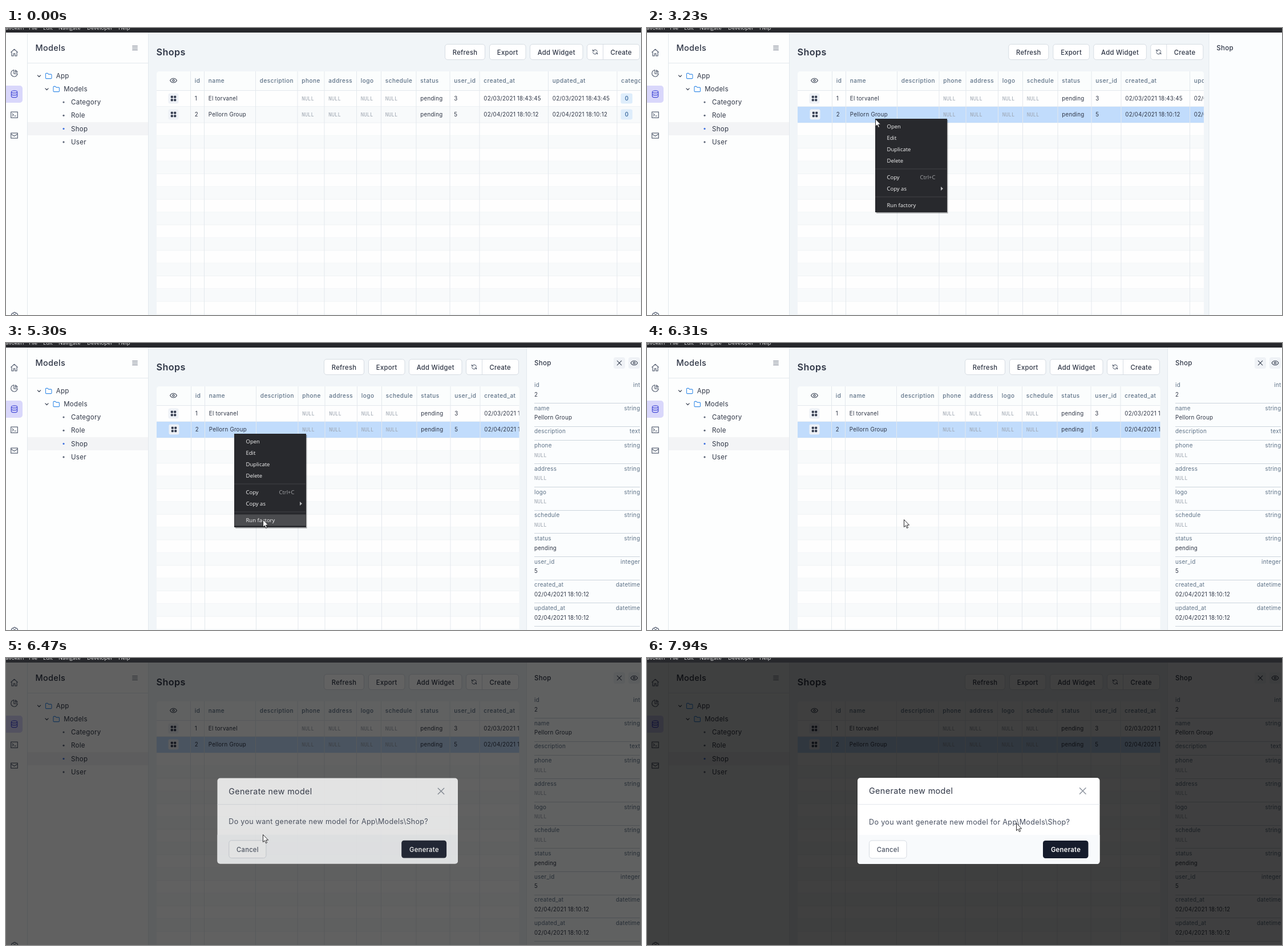
Write an HTML page that moves like this. It is 1113 by 503 pixels and loops after 8000 ms.

```html
<!DOCTYPE html>
<html lang="en">
<head>
<meta charset="utf-8">
<title>Model browser</title>
<style>
  html, body { margin: 0; width: 100%; height: 100%; overflow: hidden; background: #f1f5f8; }
  svg { display: block; width: 100vw; height: 100vh; }
  text { font-family: Inter, sans-serif; letter-spacing: .025em; white-space: pre; }
  .mono { font-family: "Noto Sans Mono", "DejaVu Sans Mono", monospace; letter-spacing: 0; }
  .sys { font-family: "Open Sans", "Noto Sans", sans-serif; letter-spacing: 0; }
  .head { letter-spacing: .05em; font-weight: 500; }
  .mid { font-weight: 500; }
  .bold { font-weight: 600; }
</style>
</head>
<body>
<svg id="stage" viewBox="0 0 1113 503" xmlns="http://www.w3.org/2000/svg"></svg>
<script>
const LOOP = 8000;
const INK = '#2f3646', LABEL = '#5d7186', RULE = '#e3e8ed';

const rect = (x, y, w, h, fill, extra = '') =>
  `<rect x="${x}" y="${y}" width="${w}" height="${h}" fill="${fill}" ${extra}/>`;
const line = (x1, y1, x2, y2, color = RULE) =>
  `<path d="M${x1} ${y1}L${x2} ${y2}" stroke="${color}"/>`;
// y is the vertical middle of the capitals
const text = (x, y, s, size, fill = INK, cls = '', anchor = 'start') =>
  `<text x="${x}" y="${y + size * .36}" font-size="${size}" fill="${fill}" class="${cls}" text-anchor="${anchor}">${s}</text>`;
// paths live on a 24 unit grid
const icon = (cx, cy, size, color, d, weight = 2) =>
  `<path transform="translate(${cx - size / 2} ${cy - size / 2}) scale(${size / 24})" d="${d}" fill="none"
    stroke="${color}" stroke-width="${weight}" stroke-linecap="round" stroke-linejoin="round"/>`;
const group = (id, body, extra = '') => `<g id="${id}" ${extra}>${body}</g>`;

const ICON = {
  home: 'M3 11L12 3L21 11M5 9.5V21H10V15H14V21H19V9.5',
  pie: 'M11 3.1A9 9 0 1 0 20.9 13H11ZM15 3.5A9 9 0 0 1 20.5 9H15Z',
  data: 'M4 6C4 2 20 2 20 6S4 10 4 6V18C4 22 20 22 20 18V6M4 12C4 16 20 16 20 12',
  term: 'M3 4H21V20H3ZM7 9L10 12L7 15M13 15H16',
  mail: 'M3 5H21V19H3ZM3 7.5L12 13.5L21 7.5',
  gear: 'M10 3H14L15 6L18 5L21 9L19 12L21 15L18 19L15 18L14 21H10L9 18L6 19L3 15L5 12L3 9L6 5L9 6ZM9 12A3 3 0 1 0 15 12A3 3 0 1 0 9 12',
  menu: 'M4 6H20M4 12H20M4 18H20',
  down: 'M5 9L12 16L19 9',
  folder: 'M3 6Q3 4 5 4H9L12 7H19Q21 7 21 9V18Q21 20 19 20H5Q3 20 3 18Z',
  eye: 'M1.5 12C6 3 18 3 22.5 12C18 21 6 21 1.5 12ZM9 12A3 3 0 1 0 15 12A3 3 0 1 0 9 12',
  sync: 'M4 4V9H9M20 20V15H15M4.6 9A8 8 0 0 1 19.9 11M19.4 15A8 8 0 0 1 4.1 13',
  close: 'M5 5L19 19M19 5L5 19'
};

const columns = [
  [324, 'id'], [348, 'name'], [438, 'description'], [511.5, 'phone'], [558.5, 'address'], [615, 'logo'],
  [658, 'schedule'], [719.5, 'status'], [778.5, 'user_id'], [830.5, 'created_at'], [951, 'updated_at'], [1071.5, 'categories']
];
const shops = [
  [1, 'El torvanel', '', null, null, null, null, 'pending', 3, '02/03/2021 18:43:45', '02/03/2021 18:43:45'],
  [2, 'Pellorn Group', '', null, null, null, null, 'pending', 5, '02/04/2021 18:10:12', '02/04/2021 18:10:12']
];
const types = ['int', 'string', 'text', 'string', 'string', 'string', 'string', 'string', 'integer', 'datetime', 'datetime'];

const value = (x, y, v) => v === null
  ? text(x, y, 'NULL', 9, '#9ba3ae', 'mono')
  : text(x, y, v, 9.72, INK);

function menuBar() {
  const items = [[-5, 'Tavoken'], [40, 'File'], [65, 'Edit'], [92, 'Navigate'], [142, 'Developer'], [197, 'Help']];
  return rect(0, 0, 1113, 8, '#27282c') + items.map(([x, s]) => text(x, 0, s, 9.5, '#e6e6e6', 'sys')).join('');
}

function sidebar() {
  let s = rect(0, 8, 250, 495, '#fdfefe') + line(37.5, 8, 37.5, 503) + line(249.5, 8, 249.5, 503) + line(38, 61.5, 250, 61.5);
  s += rect(-6, 101, 35, 30, '#d9d7fb', 'rx="5"');
  ['home', 'pie', 'data', 'term', 'mail'].forEach((k, i) =>
    s += icon(14.5, 43 + i * 36.4, 15.5, k === 'data' ? '#4a50d8' : '#5c6577', ICON[k], 1.9));
  s += icon(15, 504, 15, '#5c6577', ICON.gear);
  s += text(51.5, 35, 'Models', 14.4, INK, 'mid') + icon(226, 35, 13, '#596273', ICON.menu);
  s += rect(38, 165, 211, 23, '#f3f4f6');
  [[58, 84, 'App'], [71.5, 107, 'Models']].forEach(([x, y, name]) => {
    s += icon(x, y, 9, '#3c4556', ICON.down, 3.2) + icon(x + 16.7, y, 14, '#3b8ee8', ICON.folder, 1.9);
    s += text(x + 29.7, y, name, 11.5);
  });
  ['Category', 'Role', 'Shop', 'User'].forEach((name, i) => {
    const y = 130 + i * 23.3;
    s += `<circle cx="101" cy="${y}" r="1.6" fill="${name === 'Shop' ? '#3b6fe0' : '#5c6577'}"/>` + text(114, y, name, 11.5);
  });
  return s;
}

function toolbar() {
  const edge = 'rx="4.5" stroke="#d6dce3"';
  let s = '';
  [[769.5, 70, 'Refresh'], [847.5, 63.5, 'Export'], [918.5, 92.5, 'Add Widget']].forEach(([x, w, name]) =>
    s += rect(x, 28.5, w, 27, '#fff', edge) + text(x + w / 2, 42.5, name, 11.25, INK, 'mid', 'middle'));
  s += rect(1018.5, 28.5, 92, 27, '#fff', edge) + line(1046.5, 29, 1046.5, 55, '#d6dce3');
  return s + icon(1032.5, 42, 12, '#4b5567', ICON.sync) + text(1059.5, 42.5, 'Create', 11.25, INK, 'mid');
}

function gridButton(y) {
  let s = rect(284.5, y - 9, 18, 18, '#eef1f6', 'rx="3"');
  for (const dx of [-4.7, .7]) for (const dy of [-4.7, .7]) s += rect(293.5 + dx, y + dy, 4, 4, '#353d50', 'rx="1"');
  return s;
}

function table() {
  let s = rect(264, 76, 848, 427, '#fefefe') + rect(264, 76, 848, 34, '#fbfdfd') + rect(264, 138, 848, 28, '#f8fafb');
  s += line(264, 109.5, 1112, 109.5) + line(264, 137.5, 1112, 137.5, '#eef1f4') + line(264, 166, 1112, 166, '#eef1f4');
  for (let i = 0; i < 16; i++) {
    const y = 166 + i * 22.37;
    if (i % 2) s += rect(264, y, 848, 22.37, '#f8fafb');
    s += line(264, y + 22.37, 1112, y + 22.37, '#f0f3f5');
  }
  s += rect(264, 138, 848, 28, '#c1dcfc', 'id="picked"');
  s += icon(293.5, 92, 13.5, '#3c4556', ICON.eye) + gridButton(123.5);
  let cells = gridButton(151.5);
  columns.forEach(([x, name], i) => {
    cells += line(x - .5, 76, x - .5, 503) + text(x + 6.8, 92.5, name, 10, LABEL, 'head');
    shops.forEach((shop, r) => {
      const y = 123.5 + r * 28;
      cells += i < 11 ? value(x + 6.8, y, shop[i])
        : rect(1077.5, y - 9, 20.5, 18, '#deedfb', 'rx="3"') + text(1088, y, 0, 9.72, '#2a5b94', 'mid', 'middle');
    });
  });
  return s + group('cells', cells);
}

function panel() {
  let s = rect(913, 8, 202, 495, '#fbfdfe') + line(912.5, 8, 912.5, 503) + text(926, 35, 'Shop', 11.5, INK, 'mid');
  [[1075, 'close', 13], [1101, 'eye', 13.5]].forEach(([x, k, size]) =>
    s += rect(x - 10, 25, 20, 20, '#eff2f6', 'rx="4"') + icon(x, 35, size, '#3c4556', ICON[k]));
  let fields = '', y = 73.5;
  types.forEach((type, i) => {
    const v = shops[1][i], empty = v === '';
    fields += text(926, y, columns[i][1], 9.9, LABEL) + text(1111.5, y, type, 9.9, LABEL, '', 'end');
    if (!empty) fields += value(926, y + 16.8, v);
    fields += line(926, Math.round(y + (empty ? 15.5 : 31.5)) + .5, 1111, Math.round(y + (empty ? 15.5 : 31.5)) + .5, '#ccd4dc');
    y += empty ? 25 : 40.65;
  });
  return s + group('fields', fields);
}

const menuItems = [['Open', 173], ['Edit', 193], ['Duplicate', 213], ['Delete', 232.5], ['Copy', 262], ['Copy as', 282], ['Run factory', 310.5]];

function contextMenu() {
  let s = rect(402, 161, 125.5, 164, '#000', 'opacity=".3"') + rect(400, 159, 126, 164, '#28292d');
  s += rect(400.5, 222.5, 125, 19.8, '#4b4c4f', 'id="hover"');
  s += line(400, 247, 525, 247, '#424347') + line(400, 296, 525, 296, '#424347');
  menuItems.forEach(([name, y]) => s += text(420.5, y, name, 9.5, '#f4f4f4', 'sys'));
  return s + text(505.5, 262, 'Ctrl+C', 9.5, '#a3a4a7', 'sys', 'end') + '<path d="M515 278L519 281.5L515 285Z" fill="#b5b6b8"/>';
}

function dialog() {
  return rect(369, 210, 424.5, 151, '#fff', 'rx="5"')
    + `<path d="M369 310H793.5V356Q793.5 361 788.5 361H374Q369 361 369 356Z" fill="#f8fafc"/>`
    + line(369, 256.5, 793.5, 256.5)
    + text(389, 233, 'Generate new model', 14.4) + icon(763.8, 233, 18, '#8b929d', ICON.close, 1.9)
    + text(389, 287, 'Do you want generate new model for App\\Models\\Shop?', 12.6, '#485061')
    + rect(389.5, 320, 65.5, 31, '#fff', 'rx="4.5" stroke="#d5dae1"') + text(422.3, 336, 'Cancel', 11.25, '#4b5363', 'mid', 'middle')
    + rect(694, 320, 79.5, 31, '#161c2c', 'rx="4.5"') + text(734, 336, 'Generate', 11.25, '#fff', 'bold', 'middle');
}

const stage = document.getElementById('stage');
stage.innerHTML = '<defs><clipPath id="clip"><rect id="window" x="264" y="76" width="848" height="440" rx="5"/></clipPath></defs>'
  + rect(0, 0, 1113, 503, '#f1f5f8')
  + text(263.5, 42.5, 'Shops', 16.2, INK, 'bold')
  + group('tools', toolbar())
  + `<g clip-path="url(#clip)">${table()}</g>`
  + group('panel', panel()) + sidebar()
  + rect(0, 8, 1113, 495, '#000', 'id="shade"')
  + menuBar()
  + group('menu', contextMenu()) + group('dialog', dialog())
  + group('pointer', '<circle id="click" r="10" fill="#ff0" fill-opacity=".47"/>'
    + '<path d="M.5 .6V13.6L3.4 10.9L5.5 15.5L7.6 14.6L5.5 10.1H9.6Z" fill="#fff" stroke="#1d1d1f" stroke-width=".95" stroke-linejoin="round"/>');

const el = {};
stage.querySelectorAll('[id]').forEach(n => el[n.id] = n);

// share done after stepping n times between the two moments
function steps(t, from, to, n) {
  if (t < from) return 0;
  const dt = n > 1 ? (to - from) / (n - 1) : 1;
  return Math.min(n, Math.floor((t - from + 5) / dt) + 1) / n;
}
const linear = p => p;
const easeOut = p => 1 - (1 - p) ** 2;

// pointer moves: start, end, steps, x, y, easing
const moves = [
  [277, 430, 3, 777, 302, easeOut],
  [750, 980, 4, 494, 162, easeOut],
  [1210, 1440, 4, 435, 172, easeOut],
  [2070, 2370, 5, 400, 159, easeOut],
  [3540, 4230, 10, 459, 228, easeOut],
  [4460, 5230, 11, 450, 308, linear],
  [5300, 5300, 1, 450, 309, linear],
  [6930, 7080, 3, 322, 262, easeOut],
  [7160, 7390, 4, 470, 229, linear],
  [7470, 7550, 2, 640, 250, linear],
  [7630, 7710, 2, 587, 265, linear],
  [7940, 7940, 1, 647, 289, linear]
];

function pointerAt(t) {
  let x = 1043, y = 485;
  for (const [from, to, n, tx, ty, ease] of moves) {
    const p = ease(steps(t, from, to, n));
    x += (tx - x) * p;
    y += (ty - y) * p;
  }
  return [x, y];
}

const show = (node, on) => node.setAttribute('visibility', on ? 'visible' : 'hidden');
const shift = (node, x, y = 0) => node.setAttribute('transform', `translate(${x} ${y})`);
const within = (t, a, b) => t >= a && t < b;

function draw(t) {
  const [x, y] = pointerAt(t);
  shift(el.pointer, x, y);
  show(el.pointer, t >= 200);
  show(el.click, within(t, 1590, 1840) || within(t, 2540, 2690) || within(t, 6080, 6310));

  show(el.picked, t >= 2690);
  const open = easeOut(steps(t, 3150, 3460, 5));
  shift(el.tools, -212 * open);
  el.window.setAttribute('width', 848 - 212.5 * open);
  shift(el.panel, 201 * (1 - open));
  show(el.panel, open > 0);
  show(el.fields, t >= 3920);

  const menu = within(t, 3070, 6310);
  show(el.menu, menu);
  shift(el.cells, menu ? 1 : 0);
  const item = menuItems.find(([, my]) => Math.abs(y - my) <= 10);
  show(el.hover, menu && x > 401 && item);
  if (item) el.hover.setAttribute('y', item[1] - 10);

  const u = t < 6310 ? 0 : Math.min(4, Math.floor((t - 6305) / 77.5)) / 4;
  const p = 1 - (1 - u) ** 2.5;
  el.shade.setAttribute('opacity', .75 * p);
  el.dialog.setAttribute('opacity', p);
  show(el.dialog, p > 0);
  el.dialog.setAttribute('transform', `translate(581.2 285.5) scale(${.96 + .04 * p}) translate(-581.2 -285.5)`);
}

const start = performance.now();
function tick() {
  draw((performance.now() - start) % LOOP);
  requestAnimationFrame(tick);
}
tick();
</script>
</body>
</html>
```
